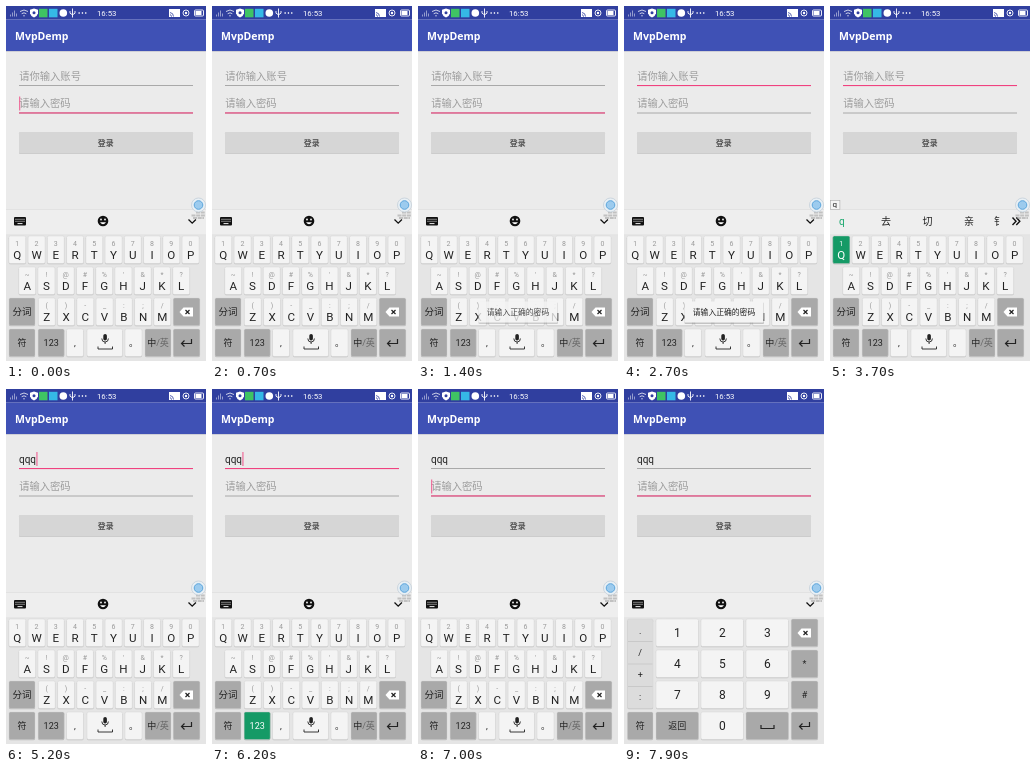
Animation, 200 px wide and 355 px high, one loop 8000 ms. Source, as an HTML page:

```html
<!DOCTYPE html>
<html lang="zh-CN">
<head>
<meta charset="utf-8">
<title>MvpDemp</title>
<style>
html, body { margin: 0; width: 100%; height: 100%; overflow: hidden; background: #ebebeb; }
svg { display: block; width: 200px; height: 355px; }
text { font-family: Roboto, "Noto Sans CJK SC", "Noto Sans CJK", sans-serif; fill: #222; }
.mid { text-anchor: middle; }
.hint { font-size: 10.3px; fill: #9c9c9c; }
.white { fill: #fff; }
.cand text { font-size: 10px; }
.cand .pick { fill: #18a66c; }
.accent { fill: #f0427f; }

.step { animation: 8s step-end infinite; }
.pw-focus { animation-name: pwFocus; }
.acc-focus { animation-name: accFocus; }
.pw-caret { animation-name: pwCaret; }
.acc-caret { animation-name: accCaret; }
.end-caret { animation-name: endCaret; }
.empty { animation-name: empty; }
.filled { animation-name: filled; }
.tools { animation-name: tools; }
.c1 { animation-name: c1; }
.c2 { animation-name: c2; }
.c3 { animation-name: c3; }
.q-press { animation-name: qPress; }
.n-press { animation-name: nPress; }
.pad { animation-name: pad; }
.toast { animation: toast 8s linear infinite; }

@keyframes pwFocus { 0%, 86.9% { opacity: 1 } 27.5% { opacity: 0 } }
@keyframes accFocus { 0%, 86.9% { opacity: 0 } 27.5% { opacity: 1 } }
@keyframes pwCaret {
  0%, 11.25%, 23.75%, 86.9% { opacity: 1 }
  5%, 17%, 27.5%, 93.1%, 100% { opacity: 0 }
}
@keyframes accCaret {
  27.5%, 40%, 52.5% { opacity: 1 }
  0%, 33.25%, 46.25%, 58.75%, 100% { opacity: 0 }
}
@keyframes endCaret {
  62.5%, 75% { opacity: 1 }
  0%, 68.75%, 81.25%, 100% { opacity: 0 }
}
@keyframes empty { 0% { opacity: 1 } 62.5%, 100% { opacity: 0 } }
@keyframes filled { 0% { opacity: 0 } 62.5%, 100% { opacity: 1 } }
@keyframes tools { 0%, 62.5%, 100% { opacity: 1 } 46.25% { opacity: 0 } }
@keyframes c1 { 0%, 50%, 100% { opacity: 0 } 46.25% { opacity: 1 } }
@keyframes c2 { 0%, 53.1%, 100% { opacity: 0 } 50% { opacity: 1 } }
@keyframes c3 { 0%, 62.5%, 100% { opacity: 0 } 53.1% { opacity: 1 } }
@keyframes qPress {
  45.5%, 49.4%, 52.5% { opacity: 1 }
  0%, 46.8%, 50.7%, 53.8%, 100% { opacity: 0 }
}
@keyframes nPress {
  76.9%, 91.9% { opacity: 1 }
  0%, 78.75%, 93.75%, 100% { opacity: 0 }
}
@keyframes pad {
  78.75%, 93.75%, 100% { opacity: 1 }
  0%, 86.9% { opacity: 0 }
}
@keyframes toast {
  0%, 15.5% { opacity: 0 }
  18%, 41.3% { opacity: 1 }
  43.8%, 100% { opacity: 0 }
}
</style>
</head>
<body>
<svg viewBox="0 0 200 355">
  <rect width="200" height="355" fill="#ebebeb"/>

  <!-- status bar -->
  <rect width="200" height="13.5" fill="#303f9f"/>
  <g fill="none" stroke="#fff" stroke-width=".9">
    <path d="M4.5 10.500v-2M6.500 10.500v-4M8.500 10.500v-6M10.500 10.500v-3" opacity=".55"/>
    <path d="M14 5.500q4-3 8 0M15.700 7.700q2.300-1.800 4.600 0M17.200 9.800h1.600" opacity=".85"/>
    <path d="M66.500 2.500v9M64 5v2.200l2.500 1.600 2.500-1.600V5"/>
    <circle cx="180" cy="7" r="3"/>
    <rect x="188.500" y="4" width="9" height="6" rx="1"/>
  </g>
  <path d="M28 2.500l4 1.300v3.500q-.5 2.700-4 4.200-3.500-1.500-4-4.200V3.800z" class="white"/>
  <circle cx="28" cy="6.700" r="1.500" fill="#303f9f"/>
  <rect x="33" y="2.800" width="8.500" height="8.500" fill="#3fc463"/>
  <rect x="43" y="2.800" width="8.500" height="8.500" fill="#35b9e6"/>
  <circle cx="57.300" cy="7" r="3.800" class="white"/>
  <path d="M72.500 7h8" stroke="#fff" stroke-width="1.300" stroke-dasharray="1.300 2"/>
  <rect x="163" y="3" width="11" height="8" class="white"/>
  <path d="M164 6.500q3.500.5 3.500 4M164 8.700q1.500.2 1.500 2" fill="none" stroke="#303f9f" stroke-width=".8"/>
  <circle cx="180" cy="7" r="1.200" class="white"/>
  <rect x="189.500" y="5" width="6" height="4" class="white"/>
  <text x="100.700" y="10" class="mid white" font-size="7.800">16:53</text>

  <!-- app bar -->
  <rect y="13.500" width="200" height="31.500" fill="#3f51b5"/>
  <rect y="45" width="200" height="1" fill="#cfcfd6"/>
  <text x="9" y="33.700" class="white" style="font:600 10.500px 'Noto Sans', sans-serif">MvpDemp</text>

  <!-- form -->
  <text x="13.200" y="74" class="hint step empty">请你输入账号</text>
  <text x="13" y="74" font-size="10" class="step filled">qqq</text>
  <text x="13.200" y="101.300" class="hint">请输入密码</text>
  <path d="M13 79.500H187M13 107H187" stroke="#999" stroke-width=".8"/>
  <rect x="13" y="79" width="174" height="1.100" class="accent step acc-focus"/>
  <rect x="13" y="106.400" width="174" height="1.100" class="accent step pw-focus"/>
  <rect x="13.300" y="63" width=".9" height="14" class="accent step acc-caret"/>
  <rect x="30.500" y="63" width=".9" height="14" class="accent step end-caret"/>
  <rect x="13.300" y="90.500" width=".9" height="14" class="accent step pw-caret"/>

  <rect x="13" y="126.600" width="174" height="21.500" rx="1" fill="#c4c4c4"/>
  <rect x="13" y="126" width="174" height="21.500" rx="1" fill="#d6d6d6"/>
  <text x="99.700" y="139.800" class="mid" font-size="7.900" font-weight="bold" style="fill:#555">登录</text>

  <!-- keyboard -->
  <rect y="203" width="200" height="152" fill="#e5e5e5"/>
  <rect y="203" width="200" height="26" fill="#eee"/>
  <path d="M0 203.500H200M0 228.800H200" stroke="#dadada" stroke-width=".6"/>
  <g class="step tools">
    <rect x="8" y="211" width="12" height="8.500" rx="1" fill="#111"/>
    <path d="M9.500 213.300h9M9.500 215.300h9" stroke="#eee" stroke-dasharray="1 1"/>
    <path d="M11.500 217.600h5" stroke="#eee"/>
    <circle cx="97" cy="215" r="5.300" fill="#111"/>
    <circle cx="95" cy="213.500" r=".9" class="white"/>
    <circle cx="99" cy="213.500" r=".9" class="white"/>
    <path d="M94 216.300q3 3.700 6 0z" class="white"/>
    <path d="M182.500 213.500l3.700 3.700 3.700-3.700" fill="none" stroke="#111" stroke-width="1.300"/>
  </g>
  <g id="cands"></g>
  <g id="letters"></g>
  <g id="numbers" class="step pad"></g>

  <!-- floating button -->
  <path d="M190 206.500h9M185.500 209.500h14M187 212h11" stroke="#8a8a8a" stroke-width="1.800" stroke-dasharray="4 .7" opacity=".45"/>
  <circle cx="192.500" cy="199" r="7" fill="#e9f0f5" stroke="#c3ced8" stroke-width=".8"/>
  <circle cx="192.500" cy="199" r="4.300" fill="#9ccbee" stroke="#5ba5dc"/>

  <!-- toast -->
  <g class="toast">
    <rect x="60.500" y="296.500" width="79.500" height="21.500" rx="1" fill="#000" opacity=".2"/>
    <rect x="60.500" y="295.500" width="79" height="21" rx="1" fill="#f4f4f4"/>
    <text x="100" y="309" class="mid" font-size="7.800" font-weight="500">请输入正确的密码</text>
  </g>
</svg>
<script>
const LIGHT = '#f4f4f4', SOFT = '#dcdcdc', DARK = '#a9a9a9', GREEN = '#159a66';
const PITCH = 19.25, RIGHT = 167.3;
const rowY = r => 230 + r * 31;
const $ = id => document.getElementById(id);

const label = (x, y, s, size, fill = '#222') =>
  `<text x="${x}" y="${y}" class="mid" font-size="${size}" style="fill:${fill}">${s}</text>`;

const box = (x, y, w, fill, h = 27.5) =>
  `<rect x="${x}" y="${y + .7}" width="${w}" height="${h}" rx="1.5" fill="#c0c0c0"/>
   <rect x="${x}" y="${y}" width="${w}" height="${h}" rx="1.5" fill="${fill}" stroke="#cfcfcf" stroke-width=".4"/>`;

const key = (x, r, w, fill, s = '', size = 9) =>
  box(x, rowY(r), w, fill) + label(x + w / 2, rowY(r) + 14 + size * .36, s, size);

const letter = (cx, r, s, sub, fill = LIGHT, ink = '#222') =>
  box(cx - 8.5, rowY(r), 17, fill) +
  label(cx, rowY(r) + 9.5, sub, 7, ink === '#222' ? '#999' : ink) +
  label(cx, rowY(r) + 22.5, s, 11.6, ink);

const letterRow = (r, x0, chars, subs) =>
  [...chars].map((c, i) => letter(x0 + i * PITCH, r, c, subs[i])).join('');

const backspace = (cx, cy) =>
  `<path d="M${cx - 7} ${cy}l4-4.500h9.500v9h-9.500z" fill="#fff"/>
   <path d="M${cx - 1} ${cy - 2}l4 4m0-4l-4 4" stroke="#222" stroke-width="1.200"/>`;

const enter = (cx, cy) =>
  `<path d="M${cx + 5} ${cy - 4}v4.500h-10m3-3l-3 3 3 3" fill="none" stroke="#222" stroke-width="1.200"/>`;

const mic =
  `<rect x="97.300" y="328" width="3.600" height="6.500" rx="1.800" fill="#222"/>
   <path d="M95.800 332.500q0 3.500 3.300 3.500t3.300-3.500M99.100 336v2M92 340.500v2.500h14.500v-2.500" fill="none" stroke="#222" stroke-width=".9"/>`;

$('letters').innerHTML =
  letterRow(0, 11.3, 'QWERTYUIOP', '1234567890') +
  letterRow(1, 21.2, 'ASDFGHJKL', ['~', '!', '@', '#', '%', "'", '&amp;', '*', '?']) +
  letterRow(2, 40.8, 'ZXCVBNM', '()-_:;/') +
  key(3, 2, 26, DARK, '分词', 9.5) + key(RIGHT, 2, 26.5, DARK) + backspace(180.5, 306) +
  key(3, 3, 26, DARK, '符') + key(32.2, 3, 26, DARK, '123') +
  key(60.5, 3, 17, LIGHT, ',') + key(81, 3, 35.5, LIGHT) + mic +
  key(119, 3, 17, LIGHT, '。') + key(139, 3, 26, DARK) +
  label(152, 340.2, '中<tspan style="fill:#666">/英</tspan>', 9) +
  key(RIGHT, 3, 26.5, DARK) + enter(180.5, 337) +
  `<g class="step q-press">${letter(11.3, 0, 'Q', '1', GREEN, '#fff')}</g>
   <g class="step n-press">${box(32.2, 323, 26, GREEN)}${label(45.2, 340.2, '123', 9, '#fff')}</g>`;

const cols = [32, 77, 122], padW = 42.5;
$('numbers').innerHTML =
  '<rect y="229.200" width="200" height="126" fill="#e5e5e5"/>' +
  box(3.5, 230, 25.5, SOFT, 89.5) +
  ['.', '/', '+', ':'].map((s, i) => label(16.2, 244.5 + i * 22.3, s, 9)).join('') +
  '<path d="M4 252.500h24.500M4 275h24.500M4 297.500h24.500" stroke="#bcbcbc" stroke-width=".6"/>' +
  [...'123456789'].map((n, i) => key(cols[i % 3], i / 3 | 0, padW, LIGHT, n, 12)).join('') +
  key(RIGHT, 0, 26.5, DARK) + backspace(180.5, 244) +
  key(RIGHT, 1, 26.5, DARK, '*') + key(RIGHT, 2, 26.5, DARK, '#') +
  key(3.5, 3, 25.5, DARK, '符') + key(cols[0], 3, padW, DARK, '返回') +
  key(cols[1], 3, padW, LIGHT, '0', 12) + key(cols[2], 3, padW, DARK) +
  '<path d="M137 336v3.500h13V336" fill="none" stroke="#222" stroke-width="1.200"/>' +
  key(RIGHT, 3, 26.5, DARK) + enter(180.5, 337);

const cands = n => {
  const words = ['去', '切', '亲'].map((c, i) => label(56 + i * 41.5, 219, c.repeat(n), 10)).join('');
  const typed = 'q'.repeat(n), w = 5 + n * 4.6;
  return `<g class="cand step c${n}">
    <rect x=".3" y="194.500" width="${w}" height="9" fill="#f5f5f5" stroke="#aaa" stroke-width=".6"/>
    <text x="2.500" y="201.200" style="font-size:8px">${typed}</text>
    <text x="9" y="219" class="pick">${typed}</text>${words}
    <text x="164" y="219">钅</text>
    <path d="M182.500 211.500l3.500 3.700-3.500 3.700M186.300 211.500l3.500 3.700-3.500 3.700" fill="none" stroke="#111" stroke-width="1.400"/>
  </g>`;
};
$('cands').innerHTML = [1, 2, 3].map(cands).join('');
</script>
</body>
</html>
```
